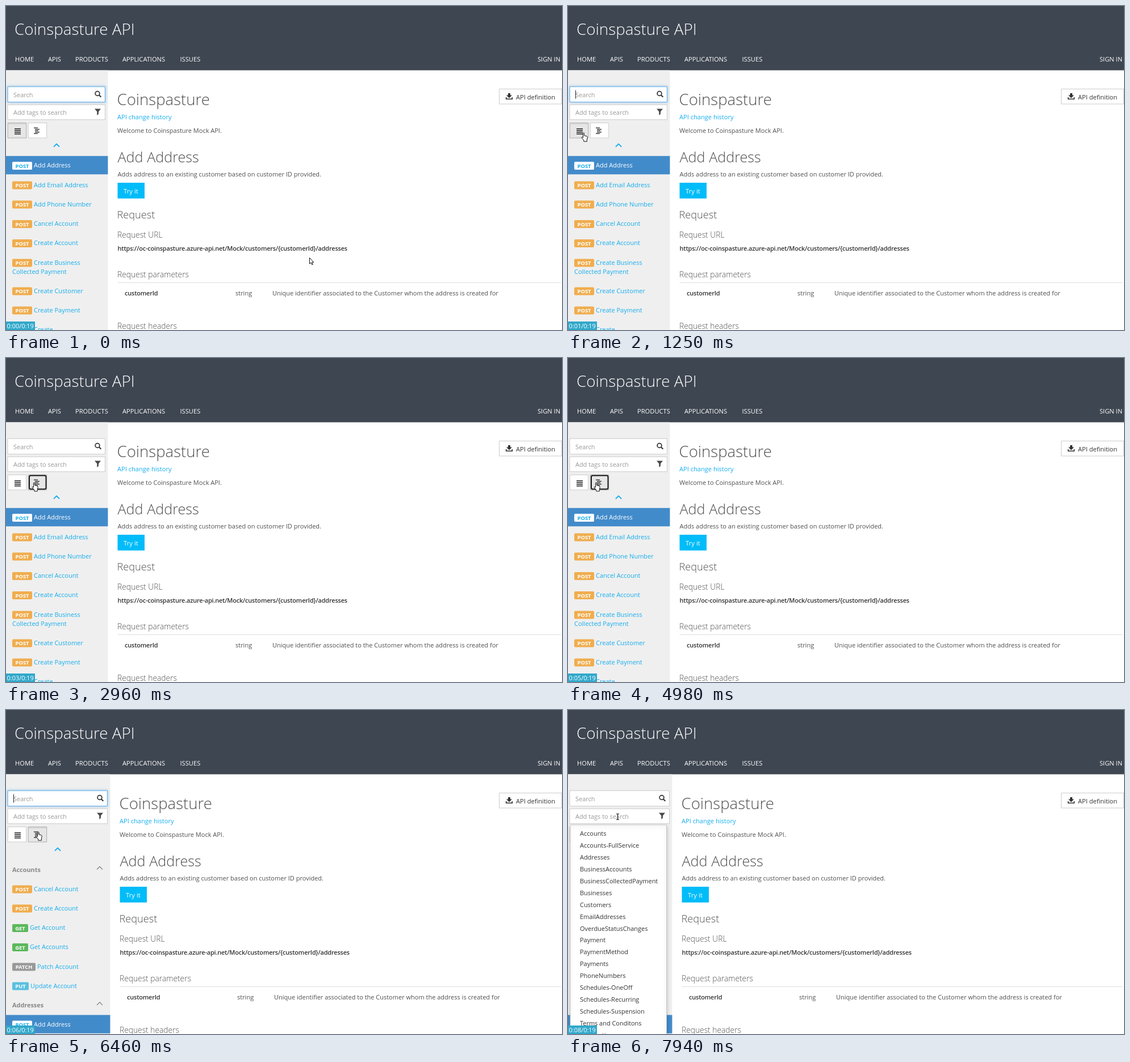
An HTML page with a canvas that plays this animation: 979x572 px, repeating every 8000 ms.

```html
<!DOCTYPE html>
<html lang="en">
<head>
<meta charset="utf-8">
<title>API portal</title>
<style>
html, body { margin: 0; width: 100%; height: 100%; overflow: hidden; background: #fff; }
canvas { display: block; }
</style>
</head>
<body>
<canvas id="stage" width="979" height="572"></canvas>
<script>
const ctx = document.getElementById('stage').getContext('2d');
const LOOP = 8000;
const FAMILY = '"Open Sans", "Noto Sans", sans-serif';
const LINK = '#16aeee', INK = '#505050', DARK = '#333';
const BADGES = {
  POST: [35, '#f0ad4e'], GET: [28, '#5cb85c'],
  PATCH: [41, '#999'], PUT: [29, '#5bc0de']
};
const FLAT_LIST = [
  ['POST', 'Add Email Address', 315.5], ['POST', 'Add Phone Number', 349.5],
  ['POST', 'Cancel Account', 384], ['POST', 'Create Account', 418],
  ['POST', 'Create Business', 452.5], ['POST', 'Create Customer', 502.5],
  ['POST', 'Create Payment', 536.5], ['POST', 'Create', 570.5]
];
const GROUPED_LIST = [
  ['POST', 'Cancel Account', 315.5], ['POST', 'Create Account', 349.5],
  ['GET', 'Get Account', 384], ['GET', 'Get Accounts', 418],
  ['PATCH', 'Patch Account', 452.5], ['PUT', 'Update Account', 486.5]
];
const TAGS = ['Accounts', 'Accounts-FullService', 'Addresses', 'BusinessAccounts',
  'BusinessCollectedPayment', 'Businesses', 'Customers', 'EmailAddresses',
  'OverdueStatusChanges', 'Payment', 'PaymentMethod', 'Payments', 'PhoneNumbers',
  'Schedules-OneOff', 'Schedules-Recurring', 'Schedules-Suspension',
  'Terms and Conditons', 'Transactions'];

// Moments of the scene, in ms
const CLICK_GROUP = 1800, REGROUP = 5050, CLICK_TAGS = 7310, OPEN_TAGS = 7790;
const SECONDS = [1020, 1960, 2960, 3970, 4980, 5910, 6930, 7940];
const SEARCH_CARET = [[180, 790], [1250, 1800], [5050, 5680], [6060, 6560], [7080, 7310]];
const POINTER = [
  [50, 534, 444], [400, 80, 232], [500, 80, 232], [680, 17, 224],
  [1220, 17, 224], [1320, 45, 219], [6410, 45, 219], [6610, 87, 188]
];

const HAND = new Path2D('M3.5 1.4Q4.6 .2 5.6 1.4V5.8L9.9 6.8Q11.5 7.3 11.2 9.5L10.3 13V16.2H4.8V14L1 9.7Q.9 8.2 2.3 8.4L3.5 9.6Z');
const ARROW = new Path2D('M.5 .5V11.2L3 9L4.8 12.8L6.4 12L4.7 8.4H7.8Z');

const between = (t, a, b) => t >= a && t < b;
const clamp = v => Math.max(0, Math.min(1, v));

function text(str, x, baseline, color = INK, size = 11, weight = 400, spacing = 0) {
  ctx.font = `${weight} ${size}px ${FAMILY}`;
  ctx.letterSpacing = spacing + 'px';
  ctx.fillStyle = color;
  ctx.fillText(str, x, baseline);
}

function rect(x, y, w, h, fill) {
  ctx.fillStyle = fill;
  ctx.fillRect(x, y, w, h);
}

function box(x, y, w, h, fill, border, radius = 0, lineWidth = 1) {
  ctx.beginPath();
  ctx.roundRect(x, y, w, h, radius);
  ctx.fillStyle = fill;
  ctx.fill();
  ctx.strokeStyle = border;
  ctx.lineWidth = lineWidth;
  ctx.stroke();
}

function line(points, color, width) {
  ctx.beginPath();
  points.forEach(([x, y]) => ctx.lineTo(x, y));
  ctx.strokeStyle = color;
  ctx.lineWidth = width;
  ctx.stroke();
}

const chevron = (x, y, color, width) =>
  line([[x - 5, y + 2.5], [x, y - 2.5], [x + 5, y + 2.5]], color, width);

function shape(points, color) {
  ctx.beginPath();
  points.forEach(([x, y]) => ctx.lineTo(x, y));
  ctx.fillStyle = color;
  ctx.fill();
}

function drawHeader() {
  rect(0, 0, 979, 113.5, '#3e4651');
  text('Coinspasture API', 15, 51, '#fff', 27.8, 300);
  [['HOME', 16], ['APIS', 74], ['PRODUCTS', 122], ['APPLICATIONS', 205],
   ['ISSUES', 306.5], ['SIGN IN', 936]]
    .forEach(([label, x]) => text(label, x, 97.5, '#fff', 11.15));
}

function drawMain(grouped) {
  const x = grouped ? 200.5 : 196.5;
  const column = grouped ? 3 : 0;
  text('Coinspasture', x - 1, 175, INK, 27.6, 300);
  text('API change history', x - 0.5, 199.5, LINK, 11.1);
  text('Welcome to Coinspasture Mock API.', x - 0.5, 223.5);
  text('Add Address', x, 276, INK, 25.2, 300);
  text('Adds address to an existing customer based on customer ID provided.', x, 300.5);
  rect(x, 312, 47.5, 27.8, '#00bcf9');
  text('Try it', x + 10.5, 330.5, '#fff', 11.3);
  text('Request', x - 1, 375, INK, 18.2, 300);
  text('Request URL', x - 0.5, 409, INK, 13.8, 300);
  text('https://oc-coinspasture.azure-api.net/Mock/customers/{customerId}/addresses',
    x, 431.5, DARK, 10.95, 600, -0.18);
  text('Request parameters', x - 0.5, 478.5, INK, 13.8, 300);
  rect(x, 488, 977 - x, 1, '#ddd');
  text('customerId', x + 12.5, 510.5, DARK, 10.95, 600, -0.18);
  text('string', 404 + column, 510.5);
  text('Unique identifier associated to the Customer whom the address is created for',
    469 + column, 510.5);
  text('Request headers', x - 0.5, 569.5, INK, 13.8, 300);

  box(868.5, 146.5, 110, 26.5, '#fff', '#ccc');
  rect(884, 154, 4, 4, DARK);
  shape([[881, 157.5], [891, 157.5], [886, 162.5]], DARK);
  line([[880.7, 161], [880.7, 164.3], [891.3, 164.3], [891.3, 161]], DARK, 1.6);
  text('API definition', 898, 164.5, DARK, 11.1);
}

function drawRow([verb, label, y], selected = false) {
  const [width, color] = BADGES[verb];
  ctx.beginPath();
  ctx.roundRect(11, y - 6, width, 14, 2);
  ctx.fillStyle = selected ? '#fff' : color;
  ctx.fill();
  ctx.textAlign = 'center';
  text(verb, 11 + width / 2, y + 4.5, selected ? LINK : '#fff', 9.4, 700);
  ctx.textAlign = 'left';
  text(label, 14 + width, y + 4, selected ? '#fff' : LINK);
}

function drawInput(y, h, right, placeholder, caret, focus = 0) {
  box(3, y + 0.3, right - 3.5, h, '#fff', '#ccc');
  if (focus > 0) {
    ctx.save();
    ctx.globalAlpha = focus;
    ctx.shadowColor = 'rgba(102,175,233,.45)';
    ctx.shadowBlur = 5;
    box(3, y + 0.3, right - 3.5, h, '#fff', '#66afe9');
    ctx.restore();
  }
  text(placeholder, 13, y + h / 2 + 4.8, '#999', 10.95);
  if (caret) rect(13, y + h / 2 - 7, 1, 15, '#222');
}

function drawToggle(x, pressed, outlined) {
  box(x + 0.2, 206.3, 32.5, 26.7, pressed ? '#e6e6e6' : '#fff', pressed ? '#adadad' : '#ccc');
  if (pressed) rect(x + 1, 207, 31, 2, '#d6d6d6');
  if (outlined) box(x + 2, 207.5, 29.5, 24, '#e6e6e6', '#1a1a1a', 2.5, 2);
}

function drawSidebar(t, grouped) {
  const width = grouped ? 183.4 : 179.4;
  const right = Math.floor(width) - 4;
  const focus = grouped ? 1 - clamp((t - OPEN_TAGS) / 80) : 1 - clamp((t - CLICK_GROUP) / 70);
  rect(0, 113.5, width, 459, '#efefef');
  drawInput(142, 27.4, right, 'Search', SEARCH_CARET.some(([a, b]) => between(t, a, b)), focus);
  drawInput(174, 26.4, right, 'Add tags to search', between(t, CLICK_TAGS, OPEN_TAGS));

  const icon = right - 14;
  ctx.beginPath();
  ctx.arc(icon, 154.5, 3.9, 0, 2 * Math.PI);
  ctx.strokeStyle = DARK;
  ctx.lineWidth = 1.7;
  ctx.stroke();
  line([[icon + 2.8, 157.3], [icon + 6.3, 160.8]], DARK, 2.1);
  shape([[icon - 5, 181.5], [icon + 6, 181.5], [icon + 2, 186.5], [icon + 2, 190.5],
    [icon - 0.7, 193], [icon - 0.7, 186.5]], '#484848');

  drawToggle(3, t < 1950, false);
  drawToggle(39, t >= CLICK_GROUP, between(t, CLICK_GROUP, REGROUP));
  for (let y = 216; y < 227; y += 3) rect(15, y, 11, 1.7, DARK);
  [[49, 7], [51, 8], [51, 6], [51, 8], [49, 7]]
    .forEach(([x, w], i) => rect(x, 214.5 + i * 2.5, w, 1.4, DARK));
  chevron(grouped ? 91 : 89, 246, LINK, 1.8);

  if (grouped) {
    [['Accounts', 281], ['Addresses', 520.5]].forEach(([label, y]) => {
      text(label, 11, y + 4.5, '#888', 10.9, 700);
      chevron(165, y - 2, '#888', 1.3);
    });
    GROUPED_LIST.forEach(row => drawRow(row));
    rect(0, 538.4, width, 32.4, '#428bca');
    drawRow(['POST', 'Add Address', 554.5], true);
  } else {
    rect(0, 264.8, width, 32.4, '#428bca');
    drawRow(['POST', 'Add Address', 281], true);
    FLAT_LIST.forEach(row => drawRow(row));
    text('Collected Payment', 11, 472.5, LINK);
  }
}

function drawTagMenu() {
  ctx.save();
  ctx.shadowColor = 'rgba(0,0,0,.2)';
  ctx.shadowBlur = 6;
  ctx.shadowOffsetY = 3;
  box(4, 203, 169.5, 390, '#fff', '#ccc');
  ctx.restore();
  TAGS.forEach((tag, i) => text(tag, 21, 222.3 + i * 20.9, DARK, 10.95));
}

function drawTimer(t) {
  rect(0, 557, 51, 15, '#31a8cb');
  const second = SECONDS.filter(s => t >= s).length;
  text(`0:0${second}/0:19`, 1.5, 569, '#fff', 10.95);
}

function pointerAt(t) {
  const next = POINTER.findIndex(([time]) => time > t);
  if (next === 0) return POINTER[0].slice(1);
  if (next < 0) return POINTER.at(-1).slice(1);
  const [t0, x0, y0] = POINTER[next - 1];
  const [t1, x1, y1] = POINTER[next];
  const p = (t - t0) / (t1 - t0);
  const eased = p * p * (3 - 2 * p);
  return [x0 + (x1 - x0) * eased, y0 + (y1 - y0) * eased];
}

function drawHighlight(x, y) {
  ctx.beginPath();
  ctx.arc(x, y, 9.8, 0, 2 * Math.PI);
  ctx.fillStyle = 'rgba(250,236,60,.72)';
  ctx.fill();
}

function drawPointer(t) {
  if (between(t, CLICK_GROUP, 2030)) drawHighlight(50, 221);
  if (between(t, CLICK_TAGS, 7470)) drawHighlight(86, 187);
  const [x, y] = pointerAt(t);
  ctx.save();
  ctx.translate(Math.round(x), Math.round(y));
  if (t >= 6580) {
    line([[0.5, -5], [0.5, 5]], '#111', 1);
    [-5, 5].forEach(end => line([[-2, end + 0.5], [3, end + 0.5]], '#111', 1));
  } else {
    const cursor = between(t, 620, 6500) ? HAND : ARROW;
    ctx.fillStyle = '#fff';
    ctx.strokeStyle = '#111';
    ctx.lineWidth = 1;
    ctx.fill(cursor);
    ctx.stroke(cursor);
  }
  ctx.restore();
}

function draw(now) {
  const t = now % LOOP;
  const grouped = t >= REGROUP;
  rect(0, 0, 979, 572, '#fff');
  drawHeader();
  drawMain(grouped);
  drawSidebar(t, grouped);
  if (t >= OPEN_TAGS) drawTagMenu();
  drawTimer(t);
  drawPointer(t);
}

const start = performance.now();
function frame() {
  draw(performance.now() - start);
  requestAnimationFrame(frame);
}
frame();
</script>
</body>
</html>
```
